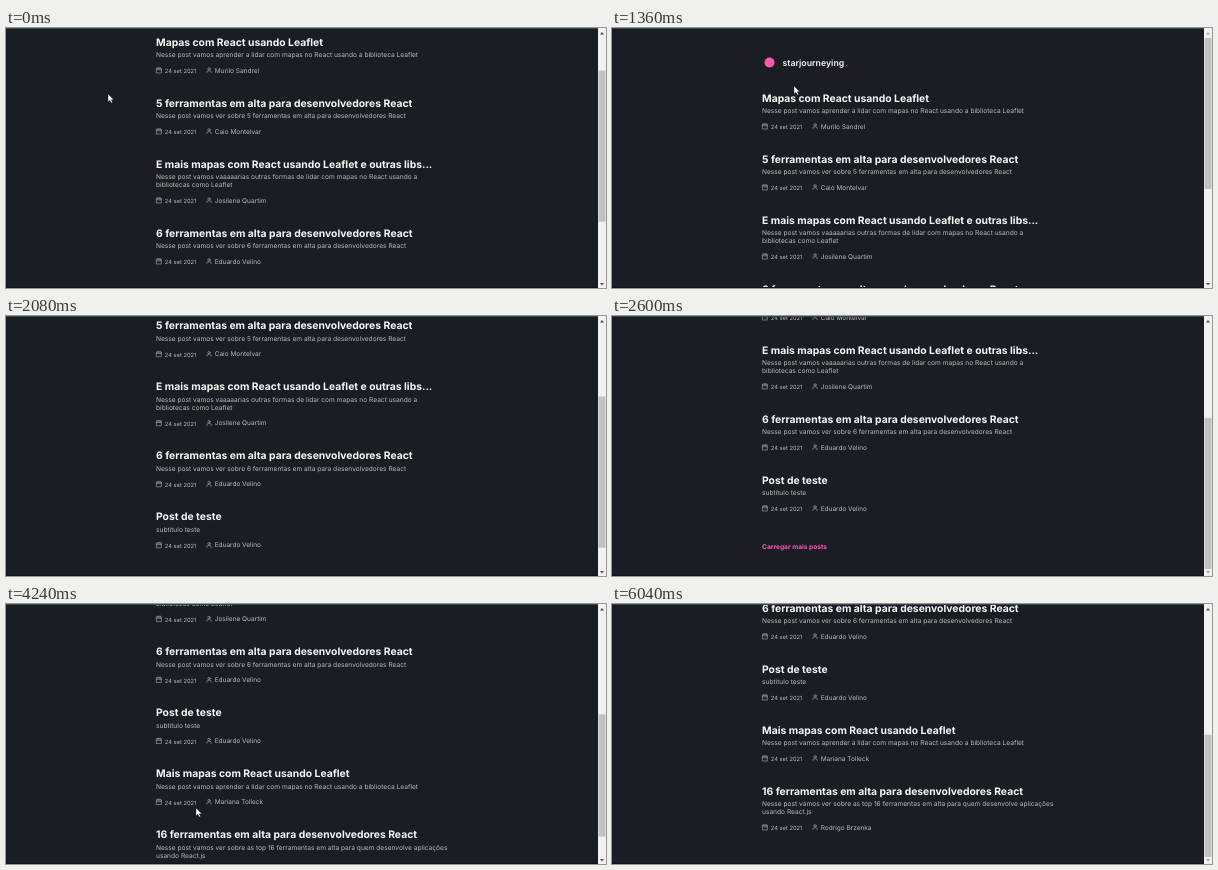
These frames come from a looping animation (600 px wide and 260 px high, 6080 ms). An HTML page:

```html
<!DOCTYPE html>
<html lang="pt-BR">
<head>
<meta charset="utf-8">
<title>Blog</title>
<style>
  html, body { margin: 0; width: 100%; height: 100%; overflow: hidden; background: #1a1d23; }
  svg { display: block; width: 600px; height: 260px; }
  text { font-family: Inter, "Open Sans", sans-serif; text-rendering: geometricPrecision; fill: #bbb; }
  .title { font-size: 10.35px; font-weight: 700; fill: #f8f8f8; }
  .sub { font-size: 6.62px; }
  .date { font-size: 5.75px; }
  .author { font-size: 6.5px; }
  .brand { font-size: 8.75px; font-weight: 600; fill: #f8f8f8; }
  .more { font-size: 6.6px; font-weight: 700; fill: #ff57b2; }
  .icon { fill: none; stroke: #bbb; stroke-width: .55; stroke-linecap: round; stroke-linejoin: round; }
</style>
</head>
<body>
<svg viewBox="0 0 600 260">
  <defs>
    <g id="meta" class="icon">
      <path d="M150.7 -2.3h4.6v4.8h-4.6zM150.7 -.7h4.6M152 -3.1v1.5M154 -3.1v1.5"/>
      <circle cx="203" cy="-1.6" r="1.2"/>
      <path d="M200.8 2.2v-.5q0-1.4 1.4-1.4h1.6q1.4 0 1.4 1.4v.5"/>
    </g>
  </defs>
  <rect width="600" height="260" fill="#1a1d23"/>
  <g id="page">
    <circle cx="157.5" cy="34.5" r="5" fill="#ff57b2"/>
    <text class="brand" x="170.5" y="37.6">starjourneying<tspan dx="1" fill="#ff57b2">.</tspan></text>
    <text id="more" class="more" x="150" y="391.4">Carregar mais posts</text>
  </g>
  <rect width="592" height="1" fill="#30474c"/>
  <rect y="259" width="592" height="1" fill="#14131d"/>
  <rect x="592" width="8" height="260" fill="#f1f1f1"/>
  <rect id="thumb" x="592.5" width="7" fill="#c1c1c1"/>
  <path id="up" d="M594 6.5l2-2.5 2 2.5z"/>
  <path id="down" d="M594 255l2 2.5 2-2.5z"/>
  <path id="cursor" d="M0 0v8l1.9-1.7 1.3 2.8 1.4-.6-1.3-2.7h2.6z" fill="#fff" stroke="#111" stroke-width=".4"/>
</svg>
<script type="module">
  const LOOP = 6080, STEP = 40, LOADED = 3440, VIEW = 260, TRACK = 243;
  const $ = id => document.getElementById(id);

  const learn = 'Nesse post vamos aprender a lidar com mapas no React usando a biblioteca Leaflet';
  const tools = n => [`${n} ferramentas em alta para desenvolvedores React`,
    [`Nesse post vamos ver sobre ${n} ferramentas em alta para desenvolvedores React`]];

  // title, subtitle lines, author
  const posts = [
    ['Mapas com React usando Leaflet', [learn], 'Murilo Sandrel'],
    [...tools(5), 'Caio Montelvar'],
    ['E mais mapas com React usando Leaflet e outras libs...',
      ['Nesse post vamos vaaaaarias outras formas de lidar com mapas no React usando a',
        'bibliotecas como Leaflet'], 'Josilene Quartim'],
    [...tools(6), 'Eduardo Velino'],
    ['Post de teste', ['subtitulo teste'], 'Eduardo Velino'],
    ['Mais mapas com React usando Leaflet', [learn], 'Mariana Tolleck'],
    ['16 ferramentas em alta para desenvolvedores React',
      ['Nesse post vamos ver sobre as top 16 ferramentas em alta para quem desenvolve aplicações',
        'usando React.js'], 'Rodrigo Brzenka']
  ];

  function add(parent, tag, attrs, content = '') {
    const el = document.createElementNS('http://www.w3.org/2000/svg', tag);
    set(el, attrs);
    el.textContent = content;
    return parent.appendChild(el);
  }

  function set(el, attrs) {
    for (const key in attrs) el.setAttribute(key, attrs[key]);
  }

  const show = (el, on) => el.style.display = on ? '' : 'none';

  const bands = [], late = [];
  let titleY = 70;
  posts.forEach(([title, lines, author], i) => {
    const g = add($('page'), 'g', {});
    const write = (cls, x, y, str) => add(g, 'text', { class: cls, x, y }, str);
    const metaY = titleY + 20.5 + lines.length * 8;
    write('title', 150, titleY + 3.7, title);
    lines.forEach((line, n) => write('sub', 150, titleY + 15.2 + n * 8, line));
    add(g, 'use', { href: '#meta', y: metaY });
    write('date', 158.8, metaY + 2.6, '24 set 2021');
    write('author', 208.7, metaY + 2, author);
    bands.push([titleY - 6, metaY + 4]);
    if (i > 4) late.push(g);
    titleY += 53 + lines.length * 8;
  });

  const glide = p => p + .26 * p * (1 - p);

  // Applies each move { from, to, end } in turn, starting at a rest position
  function follow(rest, moves, t) {
    return moves.reduce((pos, { from, to, end }) => {
      const k = glide(Math.min(1, Math.max(0, (t - from) / (to - from))));
      return pos.map((v, i) => v + (end[i] - v) * k);
    }, rest);
  }

  const scrolls = [
    { from: 0, to: 560, end: [0] },
    { from: 1380, to: 2360, end: [158] },
    { from: 3720, to: 4770, end: [257] }
  ];
  const points = [
    { from: 640, to: 1000, end: [292, 100] },
    { from: 1000, to: 1340, end: [182, 58] },
    { from: 1360, to: 1700, end: [184, 66] },
    { from: 2540, to: 2740, end: [398, 36] },
    { from: 2740, to: 3000, end: [185, 227] },
    { from: 3700, to: 4200, end: [190, 204] },
    { from: 4960, to: 5300, end: [538, 60] },
    { from: 5300, to: 5600, end: [300, 4] },
    { from: 5640, to: 6040, end: [160, 140] }
  ];

  function draw(t) {
    const [scroll] = follow([56], scrolls, t);
    const [x, y] = follow([102, 66], points, t);
    const loaded = t >= LOADED;
    const height = loaded ? 517 : 418;
    const ratio = TRACK / height;
    const arrow = active => ({ fill: active ? '#505050' : '#a3a3a3' });

    set($('page'), { transform: `translate(0 ${-scroll})` });
    late.forEach(g => show(g, loaded));
    show($('more'), !loaded);
    set($('thumb'), { y: 10 + scroll * ratio, height: VIEW * ratio });
    set($('up'), arrow(scroll > 0));
    set($('down'), arrow(scroll < height - VIEW));

    // The arrow disappears over links
    const overLink = x >= 150 && x <= 442 &&
      bands.some(([a, b]) => y + scroll >= a && y + scroll <= b);
    set($('cursor'), { transform: `translate(${x} ${y})` });
    show($('cursor'), !overLink);
  }

  const start = performance.now();
  function tick() {
    const t = (performance.now() - start) % LOOP;
    draw(Math.floor(t / STEP) * STEP);
    requestAnimationFrame(tick);
  }
  tick();
</script>
</body>
</html>
```
